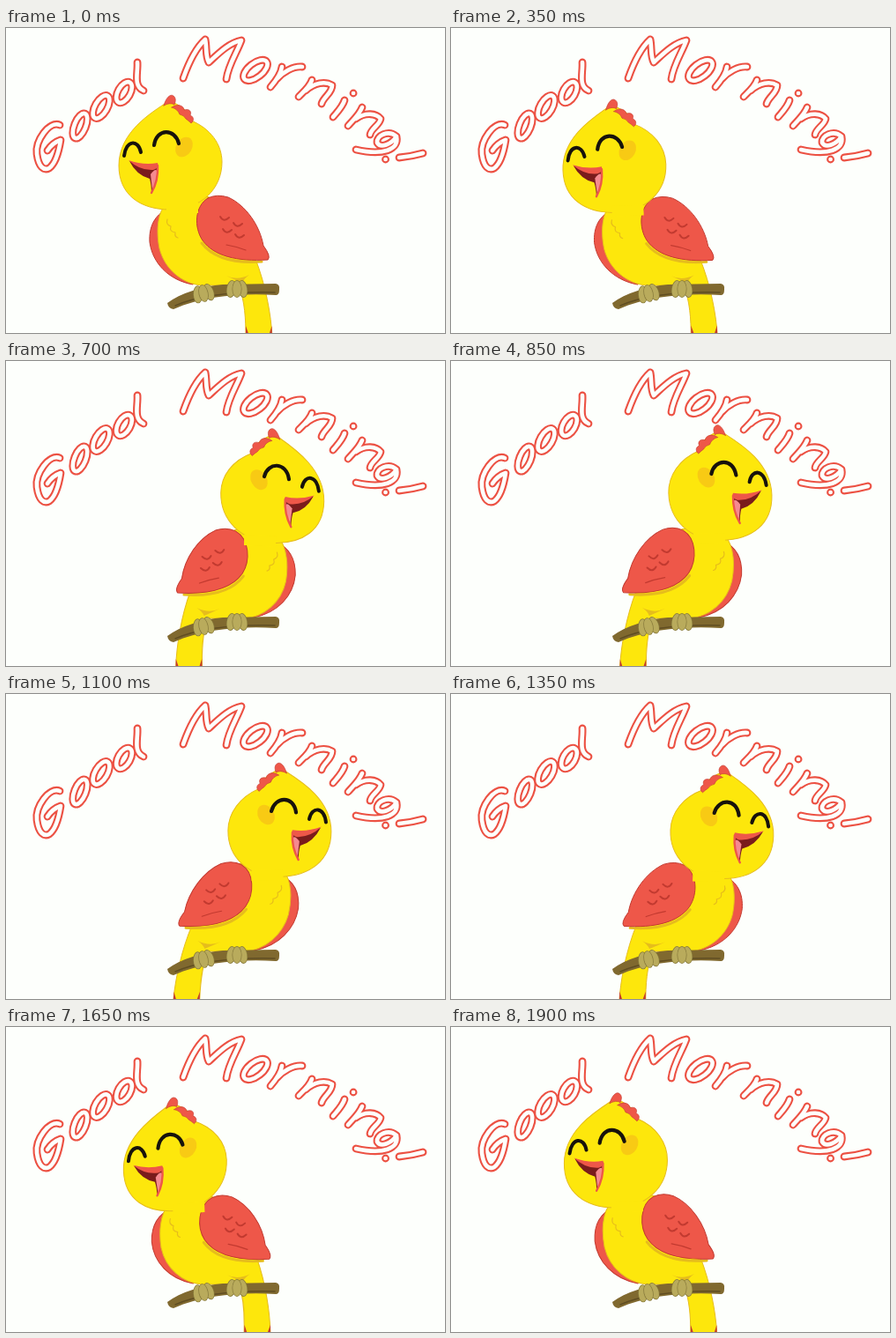
These frames come from a looping animation (498 by 346 pixels, 1950 ms). An HTML page with a canvas:

```html
<!DOCTYPE html>
<html lang="en">
<head>
<meta charset="utf-8">
<title>Good Morning!</title>
<style>
html, body { margin: 0; width: 100%; height: 100%; overflow: hidden; background: #fdfffc; }
canvas { display: block; width: 498px; height: 346px; }
</style>
</head>
<body>
<canvas id="stage" width="498" height="346" role="img" aria-label="Good Morning!"></canvas>
<script>
const ctx = document.getElementById('stage').getContext('2d');
const LOOP = 1950, HALF = LOOP / 2, STEP = 50;
const LEFT_START = 1600, FRONT_AT = 875, MIRROR = 493, PERCH = 300;

const PAPER = '#fdfffc', YELLOW = '#fde70c', GOLD = '#e6bd1c', CHEEK = '#f8ca14';
const RED = '#ee5749', DARK_RED = '#c23a30', MAROON = '#7a1c1c', PINK = '#f58a90';
const BLACK = '#17120c', BARK = '#80692f', BARK_DARK = '#5f4d22';
const CLAW = '#b9ab5c', CLAW_DARK = '#85783a', INK = '#ec5143';

function fill(d, color, edge, width = 1) {
  const p = new Path2D(d);
  ctx.fillStyle = color;
  ctx.fill(p);
  if (edge) line(p, edge, width);
}

function line(d, color, width) {
  ctx.strokeStyle = color;
  ctx.lineWidth = width;
  ctx.stroke(d instanceof Path2D ? d : new Path2D(d));
}

function oval(x, y, rx, ry, deg, color) {
  ctx.beginPath();
  ctx.ellipse(x, y, rx, ry, deg * Math.PI / 180, 0, 7);
  ctx.fillStyle = color;
  ctx.fill();
}

// Hand lettering: one path per letter
function ring(x, y, rx, ry, deg) {
  const p = new Path2D();
  p.ellipse(x, y, rx, ry, deg * Math.PI / 180, 0, 2 * Math.PI);
  return p;
}

function joined(p, d) {
  p.addPath(new Path2D(d));
  return p;
}

const letters = [
  new Path2D('M61 110C49 105 33 128 35 143C37 158 43 162 49 159C57 153 60 140 62 127C56 129 51 133 47 139'),
  ring(84, 111, 6.5, 15, 22),
  ring(108, 89.5, 7, 14.5, 30),
  joined(ring(134, 73, 7, 13, 30), 'M149 39C150 50 144 66 156 71'),
  new Path2D('M201 57C207 40 216 22 226 13C228 22 226 32 230 39C240 30 252 17 267 14C262 28 252 42 250 58'),
  ring(283, 48, 8, 16, 52),
  new Path2D('M313 44C312 52 306 60 300 67M307 58C314 50 326 43 336 44'),
  new Path2D('M347 59C345 66 338 72 332 78M340 71C350 62 362 60 370 65C370 74 360 78 358 86'),
  new Path2D('M384 82C382 89 376 95 371 101M394 74h.1'),
  new Path2D('M404 90C401 98 394 104 388 111M397 103C408 95 420 97 425 103C424 110 414 114 413 121'),
  new Path2D('M443 123C434 115 420 122 421 130C425 137 437 132 443 123C446 138 428 145 397 138'),
  new Path2D('M446 147C456 146 466 144 473 142M430.5 149h.1')
];

function drawText() {
  for (const p of letters) {
    line(p, INK, 8.8);
    line(p, PAPER, 4.6);
  }
}

function drawPerch() {
  fill('M183 312C198 301 222 293 246 291L306 290Q311 291 310 297Q310 303 306 303C270 301 226 303 190 319Q184 318 183 312Z', BARK);
  line('M192 315C222 302 262 299 305 300', BARK_DARK, 1.5);
  claw(224, 301, -12);
  claw(262, 296, 0);
}

function claw(x, y, deg) {
  ctx.save();
  ctx.translate(x, y);
  ctx.rotate(deg * Math.PI / 180);
  for (const dx of [-6.5, 6.5, 0]) {
    oval(dx, 0, 5.5, 10, dx * -1.5, CLAW_DARK);
    oval(dx, 0, 4.8, 9.3, dx * -1.5, CLAW);
  }
  ctx.restore();
}

function sideBody() {
  fill('M184 205C168 212 162 226 163 243C166 266 184 286 212 291L222 270Z', RED, DARK_RED);
  fill('M182 198C170 212 171 235 174 250C180 274 200 290 222 292L264 292C271 310 272 330 272 352L302 352C301 325 294 290 283 262C288 230 250 190 218 190Z', YELLOW, GOLD);
  line('M183 217q-2 6 4 8q-2 6 5 7q-1 5 3 6', GOLD, 1.2);
  line('M222 244C236 262 262 267 290 265', GOLD, 3);
  fill('M250 281Q262 287 276 280Q270 284 268 289Q258 285 250 281Z', GOLD);
  fill('M272 338L277 352H272ZM301.5 338L297 352H302Z', DARK_RED);
  fill('M229 193C214 202 213 226 223 241C236 259 262 265 297 263Q301 259 292 247C288 224 272 201 252 192Q239 188 229 193Z', RED, DARK_RED);
  for (const [x, y] of [[243, 214], [258, 221], [246, 228], [260, 234]])
    line(`M${x} ${y}q4 7 10 1`, DARK_RED, 2);
  line('M250 246q12 2 22 6', DARK_RED, 1.2);
}

function sideHead() {
  fill('M183 84C165 96 128 118 128 156C128 189 152 206 186 206C222 206 245 182 245 152C245 132 232 114 210 105C211 98 198 88 191 85Z', YELLOW, GOLD);
  ctx.fillStyle = YELLOW;
  ctx.fillRect(182, 198, 36, 12);
  fill('M179 88C181 80 186 74 190 77Q194 80 191 87Q186 84 179 88Z', RED, DARK_RED, .6);
  fill('M188 90C194 85 202 88 202 93C208 91 211 95 209 99C214 101 213 106 210 108Q207 105 204 103Q202 99 197 98Q195 92 188 90Z', RED, DARK_RED, .6);
  oval(202, 135, 9, 12, 30, CHEEK);
  line('M134 145C136 127 150 126 153 141', BLACK, 4);
  line('M168 133C171 113 192 114 196 131', BLACK, 4.2);
  fill('M140 151Q156 157 172 154Q174 170 165 188Q165 178 163 171Q148 167 140 151Z', MAROON);
  fill('M164 166Q170 158 172 163Q171 176 166 184Z', PINK);
  fill('M139 150Q156 156 172 153Q174 159 167 161Q152 162 139 150Z', RED);
  line('M172 156Q173 173 165 187', RED, 2.4);
}

function frontBody() {
  fill('M196 222C178 228 176 248 182 262Q190 280 208 286H274C292 278 302 262 302 242Q301 226 288 218Z', RED, DARK_RED);
  fill('M196 215C184 240 190 275 216 292H266C290 278 296 245 286 212Z', YELLOW, GOLD);
  fill('M237 290Q236 320 234 352H270Q266 320 260 290Z', YELLOW, GOLD);
  fill('M265 333L269 352H262Z', DARK_RED);
}

function frontHead() {
  fill('M222 130C187 135 162 160 163 190C164 222 196 238 232 238C270 238 300 214 301 184C300 154 276 135 248 130Z', YELLOW);
  line('M222 130C187 135 162 160 163 190C164 222 196 238 225 238M248 130C276 135 300 154 301 184C300 214 270 238 242 238', GOLD, 1);
  line('M222 243q5 6 9 3q4 6 9 1', GOLD, 1.3);
  fill('M219 133Q228 124 228 111Q234 104 240 109L248 132Z', YELLOW);
  fill('M227 111Q233 104 240 108Q241 112 242 114Q247 117 245 121Q251 125 248 132Q241 126 237 115Q231 112 227 111Z', RED, DARK_RED, .6);
  oval(185, 196, 9, 8, 0, CHEEK);
  oval(281, 189, 8, 8, 0, CHEEK);
  line('M177 194C180 176 203 172 211 187', BLACK, 4);
  line('M242 188C245 169 269 168 276 186', BLACK, 4);
  fill('M212 186Q225 196 235 208Q228 221 219 229Q218 216 214 207Q209 195 212 186Z', MAROON);
  fill('M219 211Q226 203 231 209Q226 218 220 224Z', PINK);
  line('M234 208Q228 220 220 228', RED, 3);
  fill('M212 186Q226 195 236 208Q228 209 223 205Q214 197 212 186Z', RED);
}

// [time within a half loop, lean, drop]
const keys = [
  [0, 12, 8], [50, 6, 3], [125, 2, -5], [225, 1, -3], [350, 0, 0],
  [500, -5, 2], [700, -1, 4], [800, 0, 4], [875, 11, 9]
];

function poseAt(u) {
  let i = 1;
  while (i < keys.length - 1 && u > keys[i][0]) i++;
  const a = keys[i - 1], b = keys[i];
  const f = (u - a[0]) / (b[0] - a[0]);
  return [1, 2].map(n => a[n] + (b[n] - a[n]) * f);
}

function drawBird(u) {
  const front = u >= FRONT_AT;
  const [lean, drop] = front ? [0, (900 - u) * .08] : poseAt(u);
  const k = lean / 150, s = 1 - drop * .4 / 150;
  ctx.transform(1, 0, -k, s, PERCH * k, PERCH * (1 - s));
  (front ? frontBody : sideBody)();
  ctx.translate(0, drop * .6);
  if (!front) nod(-(lean + drop) / 2);
  (front ? frontHead : sideHead)();
}

// Tilts the head about its middle
function nod(deg) {
  ctx.translate(187, 160);
  ctx.rotate(deg * Math.PI / 180);
  ctx.translate(-187, -160);
}

function draw(now) {
  const t = Math.floor(now % LOOP / STEP) * STEP;
  const phase = (t - LEFT_START + LOOP) % LOOP;
  ctx.fillStyle = PAPER;
  ctx.fillRect(0, 0, 498, 346);
  ctx.lineCap = ctx.lineJoin = 'round';
  drawText();
  ctx.save();
  if (phase >= HALF) {
    ctx.translate(MIRROR, 0);
    ctx.scale(-1, 1);
  }
  drawBird(phase % HALF);
  ctx.restore();
  drawPerch();
}

const start = performance.now();
function tick() {
  draw(performance.now() - start);
  requestAnimationFrame(tick);
}
tick();
</script>
</body>
</html>
```
